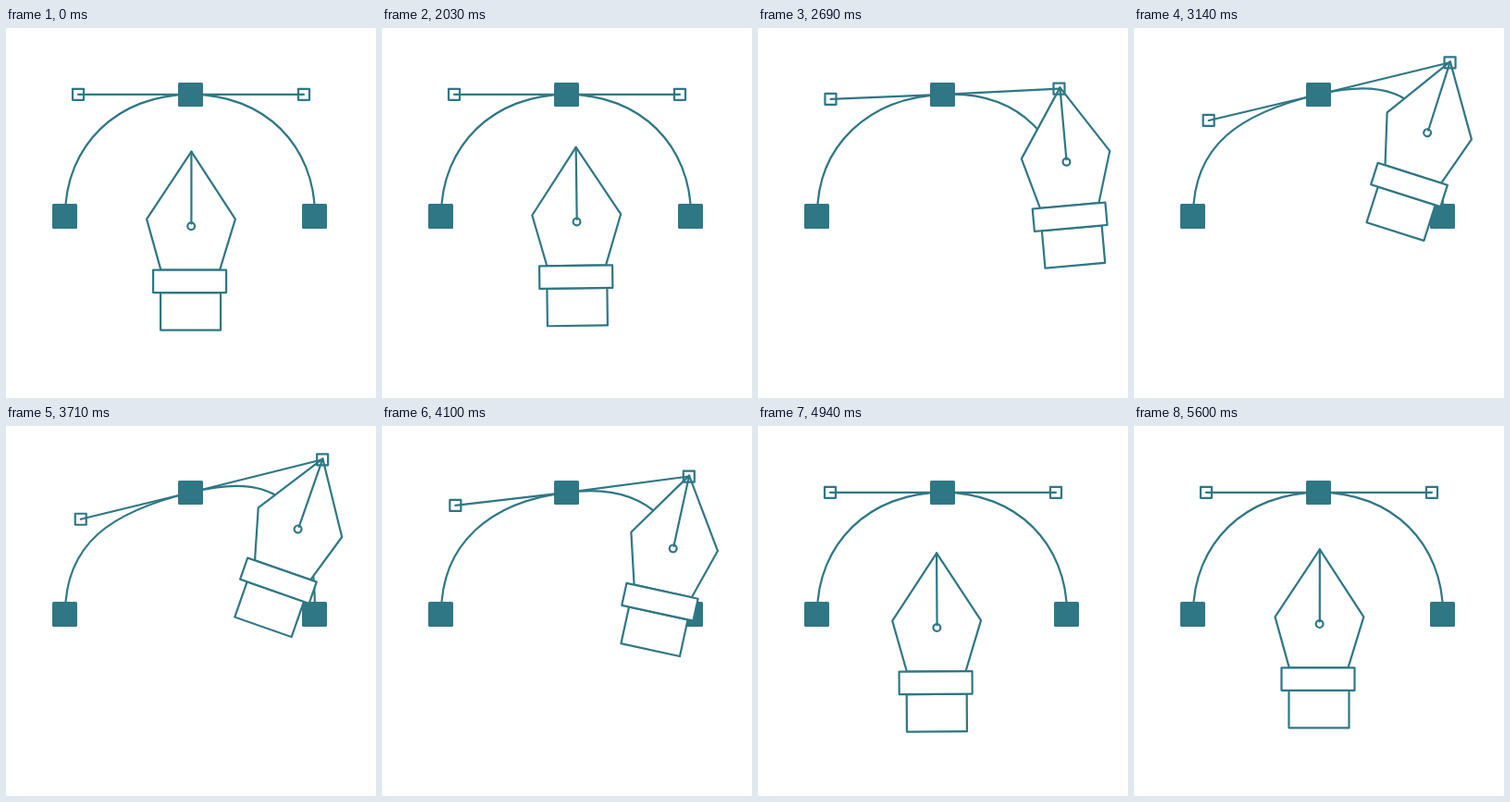
Recreate the animation shown at these times as an HTML page. Size 400 px wide and 400 px high, loop 5.69 s.

```html
<!DOCTYPE html>
<html lang="en">
<head>
<meta charset="utf-8">
<title>Pen tool</title>
<style>
  html, body { margin: 0; width: 100%; height: 100%; overflow: hidden; background: #fff; }
  svg { display: block; width: 100vw; height: 100vh; }
  .line { fill: none; stroke: #2f7784; stroke-width: 2.2; stroke-linejoin: round; stroke-linecap: round; }
  .paper { fill: #fff; }
  .anchor { fill: #2f7784; }
</style>
</head>
<body>
<svg viewBox="0 0 400 400">
  <path id="curve" class="line"/>
  <path id="bar" class="line"/>
  <rect class="anchor" x="50" y="190" width="27" height="27" rx="1.5"/>
  <rect class="anchor" x="186" y="59" width="27" height="26" rx="1.5"/>
  <rect class="anchor" x="320" y="190" width="27" height="27" rx="1.5"/>
  <g id="pen">
    <path class="line paper" d="M0 0L47.5 73L30.7 128H-33L-48.3 73Z"/>
    <path class="line" d="M0 0V78"/>
    <circle class="line" cx="-.2" cy="80.7" r="3.9"/>
    <rect class="line paper" x="-33.3" y="152.5" width="65" height="40.5"/>
    <rect class="line paper" x="-41.3" y="128" width="79" height="24.5"/>
  </g>
  <rect id="left" class="line" x="-6" y="-6" width="12" height="12"/>
  <rect id="right" class="line" x="-6" y="-6" width="12" height="12"/>
</svg>
<script>
const LOOP = 5690, START = 2030, STEP = 30;
const LEAVE = 1985, RAISE = 2540, LOWER = 3538, LEVEL = 4304, RETURN = 4456;
const HOME = [200.4, 133.6], MID = [200, 71.8], REACH = 122;

const el = id => document.getElementById(id);
const curve = el('curve'), bar = el('bar'), pen = el('pen'), left = el('left'), right = el('right');
const lerp = (a, b, k) => a + (b - a) * k;
const part = (t, from, to) => Math.min(1, Math.max(0, (t - from) / (to - from)));
const toward = (p, k) => p.map((v, i) => lerp(MID[i], v, k));
const place = (node, [x, y], deg = 0) =>
  node.setAttribute('transform', `translate(${x} ${y}) rotate(${deg})`);

// Damped spring from 0 to 1 that overshoots a little
function spring(ms, speed) {
  const a = Math.max(0, ms) / 1000 * speed, damp = 0.87;
  return 1 - Math.exp(-damp * a) * (Math.cos(a) + damp * Math.sin(a));
}

// Handle height: soft rise, then an accelerating fall
function lift(t) {
  return t < LOWER
    ? 1 - (1 - part(t, RAISE, LOWER) ** 1.75) ** 4.85
    : 1 - part(t, LOWER, LEVEL) ** 2;
}

function draw(time) {
  const t = START + Math.floor((time - START) / STEP) * STEP;
  const up = lift(t);
  const away = time < START ? 0 : spring(t - LEAVE, 7.2) - spring(t - RETURN, 5.92);

  const l = [MID[0] - REACH + 2.9 * up, MID[1] + 30.5 * up];
  const r = [MID[0] + REACH + 21.2 * up, MID[1] - 37.4 * up];
  const pull = 0.65 + 0.08 * up;
  bar.setAttribute('d', `M${l}L${MID}L${r}`);
  curve.setAttribute('d', `M64 203C64 127 ${toward(l, pull)} ${MID}`
    + `C${toward(r, pull)} 334 ${127 - 36 * up} 334 203`);
  place(left, l);
  place(right, r);

  const tilt = lerp(t < LOWER ? -10 : 5.7, 20, up);
  place(pen, [lerp(HOME[0], r[0] + 0.3, away), lerp(HOME[1], r[1] - 0.9, away)], tilt * away);
}

const begin = performance.now();
function tick() {
  draw((performance.now() - begin) % LOOP);
  requestAnimationFrame(tick);
}
tick();
</script>
</body>
</html>
```
